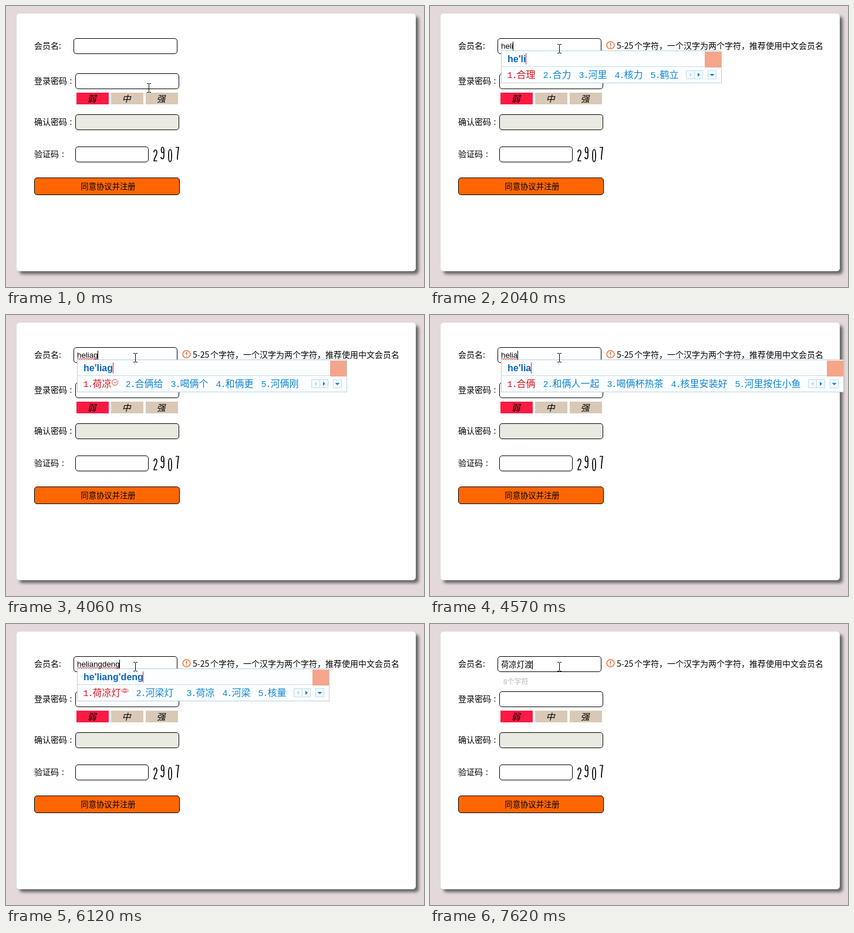
These frames come from a looping animation (712 px wide and 480 px high, 8 s). An HTML page:

```html
<!DOCTYPE html>
<html lang="zh-CN">
<head>
<meta charset="utf-8">
<title>会员注册</title>
<style>
html, body { margin: 0; width: 712px; height: 480px; overflow: hidden; background: #e3d9da; }
#panel { position: absolute; left: 18px; top: 13px; width: 680px; height: 440px; border-radius: 5px; background: #fff; box-shadow: 5px 5px 5px #666; }
svg { position: absolute; left: 0; top: 0; }
text { font: 14px "Noto Sans CJK SC", "Noto Sans CJK", sans-serif; white-space: pre; }
.field { fill: #fff; stroke: #000; }
.level { font-size: 15px; font-style: italic; text-anchor: middle; }
.button { font-size: 13.33px; text-anchor: middle; }
#count { font-size: 12px; font-weight: bold; fill: #ccc; }
#typed { font: 13.33px "Liberation Sans", "Noto Sans CJK SC", sans-serif; }
#pinyin { font: bold 16px "Liberation Sans", sans-serif; fill: #0a64be; }
#words .no { font: 15px "Liberation Mono", monospace; letter-spacing: -1px; }
#words text { font-size: 16px; font-weight: 300; fill: #0a84d2; }
#words .first, #words .first .no { fill: #d4111b; }
.line { fill: none; stroke: #000; }
</style>
</head>
<body>
<div id="panel"></div>
<svg width="712" height="480" viewBox="0 0 712 480">
  <text x="48" y="73">会员名:</text>
  <text x="48" y="133">登录密码<tspan x="108.5">:</tspan></text>
  <text x="48" y="203">确认密码<tspan x="108.5">:</tspan></text>
  <text x="48" y="258">验证码<tspan x="95">:</tspan></text>

  <rect class="field" x="115.5" y="55.5" width="176" height="26" rx="4.5"/>
  <rect class="field" x="118.5" y="115.5" width="176" height="26" rx="4.5"/>
  <rect class="field" x="118.5" y="185.5" width="176" height="26" rx="4.5" style="fill:#eaeae2"/>
  <rect class="field" x="118.5" y="240.5" width="124" height="26" rx="4.5"/>
  <rect class="field" x="48.5" y="293.5" width="247" height="29" rx="4.5" style="fill:#f60"/>
  <text class="button" x="174" y="313">同意协议并注册</text>

  <path fill="#fc1944" d="M120 148h55v20h-55z"/>
  <path fill="#d8c8b5" d="M179 148h55v20h-55zM238 148h55v20h-55z"/>
  <text class="level" x="146" y="163.5">弱</text>
  <text class="level" x="205" y="163.5">中</text>
  <text class="level" x="264" y="163.5">强</text>

  <path class="line" stroke-width="1.7" d="M252 250q0-4 2.5-4t2.5 4c0 5-5 10-5 14.5h5.5
    M269 247c0-8-4.500-7-4.500-1s4.500 6 4.500 0v9q0 6-2.500 6t-2.500-3
    M279.500 245c-3.500 0-3.500 21 0 21s3.500-21 0-21
    M289 241.500h5c-1 6-2 14-2 21"/>

  <g id="hint">
    <circle cx="307.500" cy="67" r="6.300" fill="none" stroke="#f07038" stroke-width="1.600"/>
    <path d="M307.500 63v5M307.500 69.500v1.700" stroke="#f07038" stroke-width="1.800"/>
    <text x="318" y="73">5-25<tspan x="348">个字符，一个汉字为两个字符，推荐使用中文会员名</tspan></text>
    <text id="count" x="124.500" y="103"></text>
  </g>

  <text id="typed" x="121" y="73"></text>
  <path id="squiggle" class="line" style="stroke:#e22"/>
  <path id="caret" class="line"/>

  <g id="popup">
    <rect id="frame" x="121.500" y="76.500" height="55" fill="#fcfeff" stroke="#b4cfe2"/>
    <path id="divider" class="line" style="stroke:#c3dcea"/>
    <rect id="badge" y="78" width="28" height="27" fill="#f4a58a"/>
    <text id="pinyin" x="132" y="96"></text>
    <path id="mark" class="line" style="stroke:#d8202a"/>
    <g id="words"></g>
    <g id="pager">
      <path d="M.500 110.500h28v14h-28zM14.500 110.500v14M37.500 110.500h14v14h-14z" fill="#f4faff" stroke="#bfdcf0"/>
      <path d="M9 114.500v6l-3.500-3z" fill="#b5d3ea"/>
      <path d="M20 114v7l4-3.500zM40.500 116h8l-4 4z" fill="#1684cc"/>
    </g>
  </g>
  <path id="cursor" class="line" d="M-3 .500h3M1 .500h3M-3 15.500h3M1 15.500h3M.500 1v14"/>
</svg>
<script>
const $ = id => document.getElementById(id);
const show = (id, on) => $(id).style.display = on ? '' : 'none';
const draw = (id, d) => $(id).setAttribute('d', d);

// Small badges behind the first candidate
const icons = {
  check: 'M8 4.500a5 5 0 1 1-2-3.500M1 4l2.500 2.500 5-5',
  eye: 'M-2 4q6-7 12 0q-6 6-12 0M2 4a2 2 0 1 0 4 0a2 2 0 1 0-4 0'
};

// gaps: extra space after each candidate
const short = { py: "he'liang", words: '荷凉 河梁 核量 合量 喝凉' };
const typo = { ...short, py: "he'liagn" };
const steps = [
  { at: 0 },
  { at: 500, moved: 1 },
  { at: 1020, hint: 1, caret: 1 },
  { at: 1530, hint: 1 },
  { at: 2040, caret: 1, py: "he'li", words: '合理 合力 河里 核力 鹤立', plain: 1 },
  { at: 2550, caret: 1, py: "he'li", words: '合理 合力 河里 核力 鹤立' },
  { at: 3060, caret: 1, ...typo },
  { at: 3560, ...typo },
  { at: 4060, caret: 1, py: "he'liag", words: '荷凉 合俩给 喝俩个 和俩更 河俩刚', gaps: [11, 0, 0, 0, 9], icon: 'check' },
  { at: 4570, caret: 1, py: "he'lia", words: '合俩 和俩人一起 喝俩杯热茶 核里安装好 河里按住小鱼' },
  { at: 5080, caret: 1, ...short },
  { at: 5600, caret: 1, py: "he'liang'de", words: '荷凉的 河梁的 核量的 合量得 喝凉的' },
  { at: 6120, caret: 1, py: "he'liang'deng", words: '荷凉灯 河梁灯 荷凉 河梁 核量', gaps: [13, 9], icon: 'eye' },
  { at: 6620, caret: 1, text: '荷凉灯渡', count: 13 },
  { at: 7120, text: '荷凉灯渡', count: 8 },
  { at: 7620, caret: 1, text: '荷凉灯渡', count: 8 }
];

function wave(width) {
  let d = 'M121 75.500';
  for (let x = 2; x <= width; x += 2) d += `L${121 + x} ${x % 4 ? 74 : 75.500}`;
  return d;
}

function drawPopup({ py, words, gaps = [], icon }) {
  let x = 131.5, out = '';
  words.split(' ').forEach((word, i) => {
    out += `<text class="${i ? '' : 'first'}" x="${x}" y="123"><tspan class="no">${i + 1}.</tspan><tspan x="${x + 16}">${word}</tspan></text>`;
    const end = x + 16 + 16 * word.length;
    if (!i && icon) out += `<path class="line" style="stroke:#d8303a" transform="translate(${end + 3} 110)" d="${icons[icon]}"/>`;
    x = end + 13 + (gaps[i] || 0);
  });
  x = Math.floor(x);
  $('words').innerHTML = out;
  $('pager').setAttribute('transform', `translate(${x})`);
  $('frame').setAttribute('width', x - 61);
  $('badge').setAttribute('x', x + 32);
  draw('divider', `M122 103.500H${x + 60}`);
  $('pinyin').textContent = py;
  draw('mark', `M${Math.floor(132 + $('pinyin').getComputedTextLength()) + .5} 81v19`);
}

function render(s) {
  const typed = s.text || (s.py || '').replaceAll("'", '');
  show('hint', s.at >= 1020);
  show('caret', s.caret);
  show('popup', s.py);
  show('squiggle', s.py && !s.plain);
  $('count').textContent = (s.count || 0) + '个字符';
  $('typed').textContent = typed;
  $('typed').setAttribute('y', s.text ? 74 : 73);
  const width = typed ? $('typed').getComputedTextLength() : 0;
  draw('caret', `M${Math.floor(121 + width) + .5} ${s.text ? 62 : 61}v15`);
  draw('squiggle', wave(width));
  if (s.py) drawPopup(s);
  $('cursor').setAttribute('transform', s.at < 500 ? 'translate(243 132)' : 'translate(220 65)');
}

const start = performance.now();
let current;
function tick() {
  const t = (performance.now() - start) % 8000;
  const step = steps.findLast(s => s.at <= t);
  if (step !== current) render(current = step);
  requestAnimationFrame(tick);
}
tick();
</script>
</body>
</html>
```
